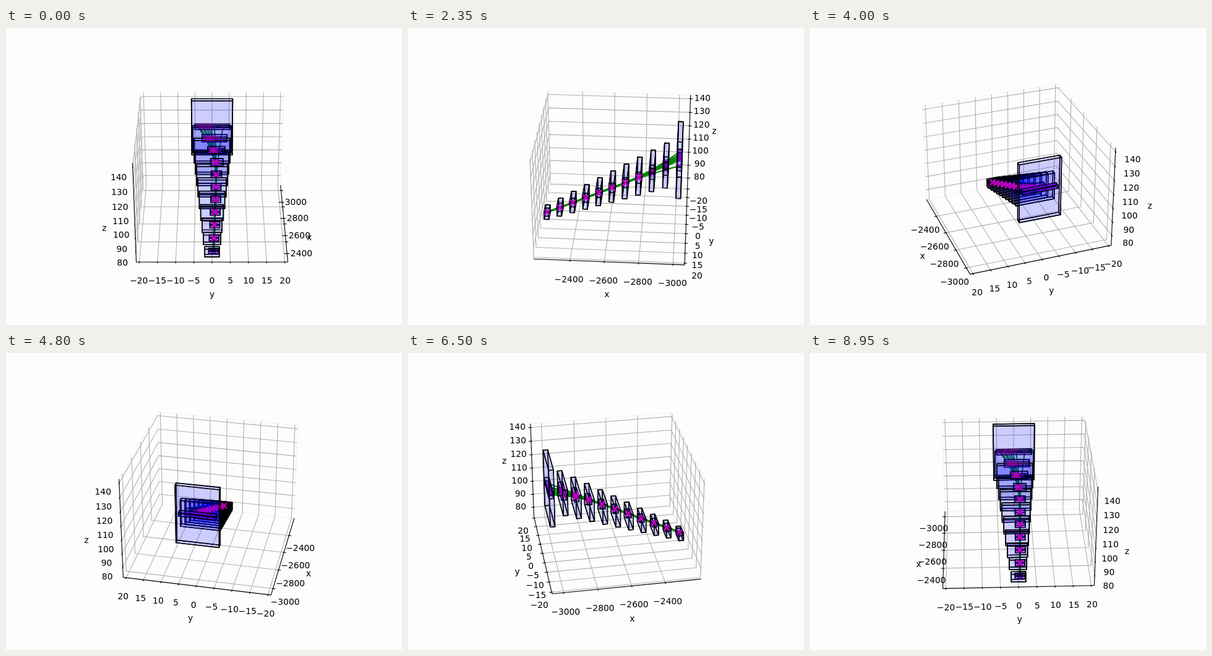
Animation, 640 px wide and 480 px high, one loop 9 s. Source, as an HTML page with a canvas:

```html
<!DOCTYPE html>
<html lang="en">
<head>
<meta charset="utf-8">
<title>Rotating 3D plot</title>
<style>
html, body { margin: 0; width: 100%; height: 100%; overflow: hidden; background: #fdfdfd; }
canvas { display: block; }
</style>
</head>
<body>
<canvas id="stage" width="640" height="480"></canvas>
<script>
const ctx = document.getElementById('stage').getContext('2d');
const PT = 100 / 72;
const STEP_MS = 50, STEPS = 180;
const ELEV = Math.PI / 6, DIST = 10, SCALE = 369.6 / 0.185;
const CENTER = [333, 237.4];

// Axis limits in data units, and the box size in world units
const LIMITS = [[-3050, -2203], [-20, 20], [73.85, 141.35]];
const SIZE = [8 / 7, 8 / 7, 6 / 7];
const DELTA = SIZE.map(s => s / 12);
const EDGE = SIZE.map(s => s / 2 + s / 48);
const PER_POINT = 48 / (2 * 369.6 / PT);
const TICKS = [range(-3000, -2400, 200), range(-20, 20, 5), range(80, 140, 10)];
const NAMES = ['x', 'y', 'z'];
const FLIPPED = [1, 0, 0];   // axis whose near side carries the edge line, also the tick direction

function range(from, to, step) {
  const out = [];
  for (let v = from; v <= to; v += step) out.push(v);
  return out;
}

const toWorld = (v, k) => ((v - LIMITS[k][0]) / (LIMITS[k][1] - LIMITS[k][0]) - 0.5) * SIZE[k];
const world = p => p.map(toWorld);
const withCoord = (p, k, v) => p.map((c, i) => i === k ? v : c);

// Scene: eleven stations, each with an outer box, an inner box and hits
const layers = range(0, 10, 1);
const layerX = i => -2216 - 80 * i;
const layerZ = i => 77.9 + 4.22 * i;
const INNER_Y = [[-.93, 1.78], [-.77, 1.88], [-.6, 2.15], [-.5, 2.25], [-.35, 2.45], [-.26, 2.54],
  [-.26, 2.73], [-.44, 3.18], [-1.25, 3.76], [-2.9, 4.4], [-5.1, 5.2]];
const TRACK_ENDS = [-4.2, -3.5, -2.9, -2.4, -1.7, -1, -.3, .5, 3.3];

function makeBox(x, [y0, y1], z, halfZ, fill) {
  const lo = world([x - 14, y0, z - halfZ]), hi = world([x + 14, y1, z + halfZ]);
  const faces = [];
  for (let k = 0; k < 3; k++) {
    const a = (k + 1) % 3, b = (k + 2) % 3;
    for (const side of [lo, hi]) {
      faces.push([[lo, lo], [hi, lo], [hi, hi], [lo, hi]].map(([u, v]) => {
        const p = [];
        p[k] = side[k]; p[a] = u[a]; p[b] = v[b];
        return p;
      }));
    }
  }
  return { faces, fill };
}

const boxes = layers.flatMap(i => {
  const half = 2 + 0.4 * i, last = i === 10;
  return [
    makeBox(layerX(i), [-half, half], layerZ(i), last ? 20.2 : 2.85 + 0.7 * i, 'rgba(0,0,255,.1)'),
    makeBox(layerX(i), INNER_Y[i], layerZ(i) + (last ? 0.2 : 0.5), last ? 1.25 : 1.2 + 0.09 * i, 'rgba(0,0,255,.1)')
  ];
});

const tracks = TRACK_ENDS.map((end, j) => layers.map(i => {
  const bend = (Math.max(0, i - 5.5) / 4.5) ** 2;
  const y = 0.4 + 0.14 * i + 0.12 * Math.sin(j * 2.4 + i) + bend * (end - 1.8);
  const z = layerZ(i) + 0.4 + (i === 10 ? 0.6 : 0.25) * Math.sin(j * 1.9 + i * 0.7 + 1.5);
  return world([layerX(i), y, z]);
}));
const hits = tracks.flat();

let cosA, sinA;
const cosE = Math.cos(ELEV), sinE = Math.sin(ELEV);

function project([x, y, z]) {
  const toward = x * cosA + y * sinA;
  const depth = DIST - toward * cosE - z * sinE;
  return [
    CENTER[0] + SCALE * (y * cosA - x * sinA) / depth,
    CENTER[1] - SCALE * (z * cosE - toward * sinE) / depth,
    depth
  ];
}

function path(points, closed) {
  ctx.beginPath();
  for (const p of points) ctx.lineTo(p[0], p[1]);
  if (closed) ctx.closePath();
}

function line(points, color, width, closed) {
  path(points.map(project), closed);
  ctx.strokeStyle = color;
  ctx.lineWidth = width * PT;
  ctx.stroke();
}

function label(text, p, drop) {
  const [x, y] = project(p);
  ctx.fillText(text, x, y + drop);
}

function drawAxes() {
  const back = EDGE.map((e, k) => [cosA, sinA, 1][k] < -1e-9 ? e : -e);
  const flip = (p, k) => withCoord(p, k, -p[k]);
  const outward = (p, skip, points) => p.map((c, k) =>
    k === skip ? c : c + Math.sign(c) * points * PER_POINT * DELTA[k]);

  for (let k = 0; k < 3; k++) {
    const a = (k + 1) % 3, b = (k + 2) % 3;
    line([back, flip(back, a), flip(flip(back, a), b), flip(back, b)], '#f5f5f5', 1, true);
  }
  for (let k = 0; k < 3; k++) {
    for (const tick of TICKS[k]) {
      const p = withCoord(back, k, toWorld(tick, k));
      line([flip(p, (k + 1) % 3), p, flip(p, (k + 2) % 3)], '#b0b0b0', 0.8);
    }
  }
  ctx.fillStyle = '#000';
  for (let k = 0; k < 3; k++) {
    const dir = FLIPPED[k];
    const edge = flip(back, dir);
    line([edge, flip(edge, k)], '#000', 0.8);
    label(NAMES[k], outward(withCoord(edge, k, 0), k, 25), 4);
    for (const tick of TICKS[k]) {
      const p = withCoord(edge, k, toWorld(tick, k));
      const reach = f => withCoord(p, dir, p[dir] + Math.sign(p[dir]) * f * DELTA[dir]);
      line([reach(-0.1), reach(0.2)], '#000', 0.8);
      label(String(tick).replace('-', '\u2212'), outward(p, k, 11.5), 11);
    }
  }
}

function drawBox({ faces, fill }) {
  const depth = f => f.reduce((sum, p) => sum + p[2], 0);
  ctx.fillStyle = fill;
  ctx.strokeStyle = '#000';
  ctx.lineWidth = PT;
  for (const face of faces.map(f => f.map(project)).sort((a, b) => depth(b) - depth(a))) {
    path(face, true);
    ctx.fill();
    ctx.stroke();
  }
}

// Crosses fade with distance
function drawHits() {
  const points = hits.map(project).sort((a, b) => b[2] - a[2]);
  const far = 1 / points[0][2], near = 1 / points[points.length - 1][2];
  const r = 3 * PT;
  ctx.strokeStyle = '#bf00bf';
  ctx.lineWidth = 1.5 * PT;
  for (const [x, y, depth] of points) {
    ctx.globalAlpha = 0.3 + 0.7 * (1 / depth - far) / (near - far);
    ctx.beginPath();
    ctx.moveTo(x - r, y - r); ctx.lineTo(x + r, y + r);
    ctx.moveTo(x - r, y + r); ctx.lineTo(x + r, y - r);
    ctx.stroke();
  }
  ctx.globalAlpha = 1;
}

function draw(step) {
  const azimuth = step * 2 * Math.PI / STEPS;
  cosA = Math.cos(azimuth);
  sinA = Math.sin(azimuth);
  ctx.fillStyle = '#fdfdfd';
  ctx.fillRect(0, 0, 640, 480);
  ctx.font = `${10 * PT}px "DejaVu Sans", sans-serif`;
  ctx.textAlign = 'center';
  ctx.lineJoin = 'round';

  drawAxes();
  for (const track of tracks) line(track, '#008000', 1.5);

  const nearest = points => Math.min(...points.map(p => project(p)[2]));
  const items = boxes.map(box => ({ depth: nearest(box.faces.flat()), paint: () => drawBox(box) }));
  items.push({ depth: nearest(hits), paint: drawHits });
  items.sort((a, b) => b.depth - a.depth).forEach(item => item.paint());
}

function loop() {
  draw(Math.floor(performance.now() / STEP_MS) % STEPS);
  requestAnimationFrame(loop);
}
loop();
</script>
</body>
</html>
```
